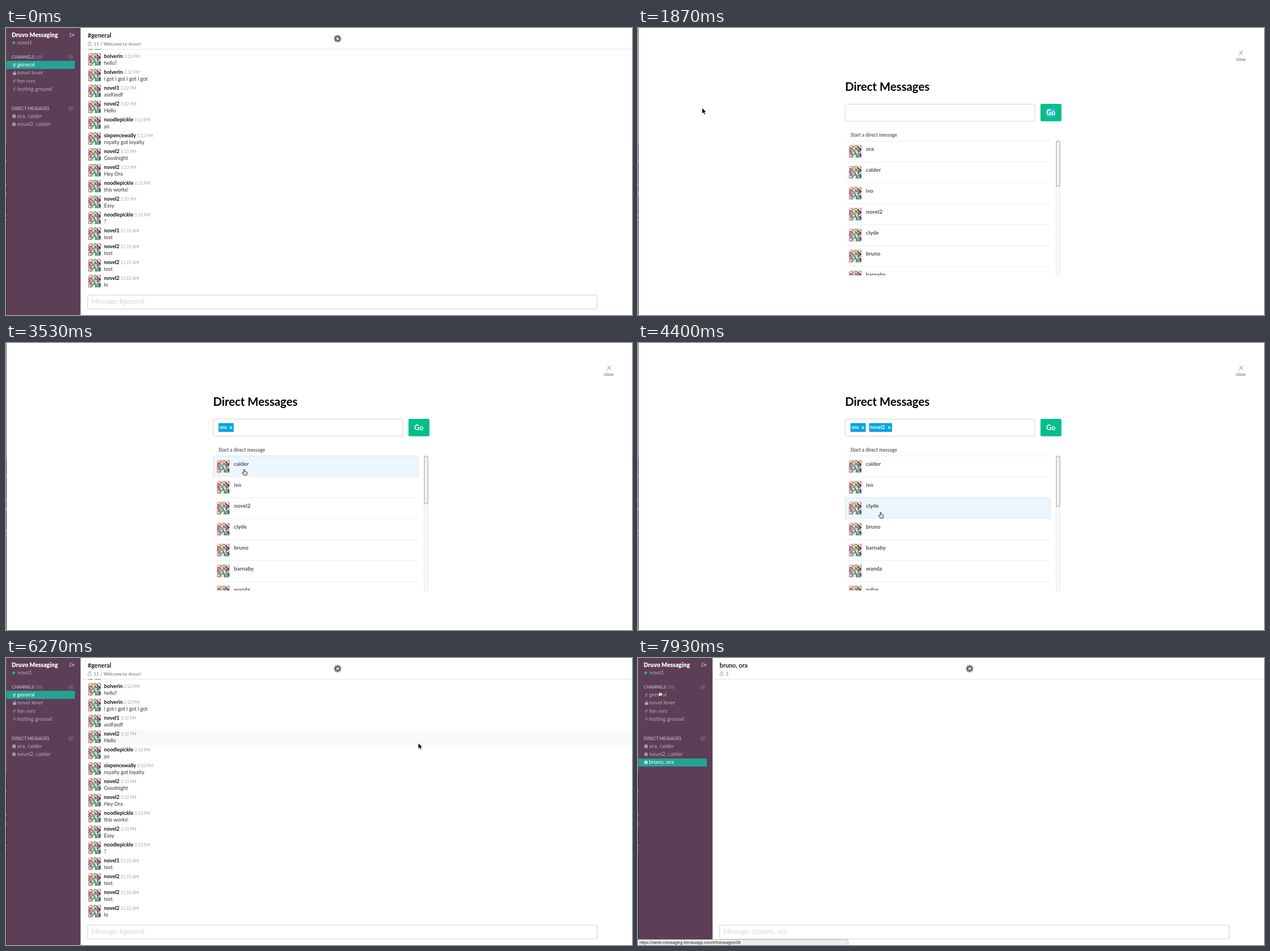
Recreate the animation shown at these times as an HTML page. Size 1104x507 px, loop 8000 ms.

```html
<!DOCTYPE html>
<html lang="en">
<head>
<meta charset="utf-8">
<title>Team chat</title>
<style>
  html, body { margin: 0; width: 100%; height: 100%; overflow: hidden; background: #fff; }
  svg { display: block; width: 1104px; height: 507px; font-family: Lato, "Open Sans", sans-serif; }
  text { white-space: pre; }
  .b { font-weight: 700; }
  .l { font-weight: 300; }
</style>
</head>
<body>
<svg viewBox="0 0 1104 507" xmlns="http://www.w3.org/2000/svg">
  <defs>
    <symbol id="avatar" viewBox="0 0 22 22" width="22" height="22"></symbol>
    <clipPath id="feedClip"><rect x="132" y="37" width="972" height="430"/></clipPath>
    <clipPath id="listClip"><rect x="365" y="199" width="363" height="238"/></clipPath>
  </defs>
  <g id="scene"></g>
  <g id="edge">
    <rect width="1" height="205" fill="#6d5450"/>
    <rect y="205" width="1" height="302" fill="#25202c"/>
    <path d="M.5 233v5M.5 275v4M.5 290v6M.5 330v3M.5 338v3" stroke="#77707c"/>
  </g>
  <g id="status"></g>
  <g id="arrow">
    <path d="M0 0V10.6L2.4 8.4L4.1 12.1L6 11.2L4.4 7.7H7.6Z" fill="#000" stroke="#fff" stroke-width=".8"/>
  </g>
  <g id="hand">
    <path d="M-.9 .6Q0-.7 .9 .6V4L4.6 4.8Q5.6 5.2 5.3 6.6L4.4 10.2H-1L-3.7 6.3Q-3.6 4.9-2.3 5.5L-.9 6.6Z"
      fill="#fff" stroke="#111" stroke-width=".9"/>
    <path d="M1.3 6.5v2M2.9 6.5v2" stroke="#111" stroke-width=".5"/>
  </g>
</svg>
<script>
const LOOP = 8000, TICK = 1000 / 15;
const $ = id => document.getElementById(id);

const users = ["ora", "calder", "ivo", "novel2", "clyde", "bruno", "barnaby", "wanda", "rufus", "penrose"];
const USER_COUNT = 19, ROW = 37;
const feed = [
  ["bolverin", "3:32 PM", "hello?"],
  ["bolverin", "3:32 PM", "i got i got i got i got"],
  ["novel1", "3:32 PM", "asdfasdf"],
  ["novel2", "3:32 PM", "Hello"],
  ["noodlepickle", "3:33 PM", "yo"],
  ["sixpencewally", "3:33 PM", "royalty got loyalty"],
  ["novel2", "3:33 PM", "Goodnight"],
  ["novel2", "3:33 PM", "Hey Ora"],
  ["noodlepickle", "3:33 PM", "this works!"],
  ["novel2", "3:33 PM", "Easy"],
  ["noodlepickle", "3:33 PM", "?"],
  ["novel1", "11:22 AM", "test"],
  ["novel2", "11:22 AM", "test"],
  ["novel2", "11:22 AM", "test"],
  ["novel2", "11:22 AM", "hi"]
];

// time, x, y of the pointer tip
const path = [
  [60, 500, 474], [870, 225, 445], [1267, 63, 142], [1600, 113, 141], [1900, 113, 141],
  [2667, 353, 210], [2870, 295, 206], [3270, 420, 222], [3500, 420, 222],
  [3950, 428, 299], [4420, 428, 299], [4730, 431, 322], [4930, 431, 322],
  [5200, 438, 176], [5400, 444, 158], [5500, 446, 150], [5650, 446, 150],
  [6060, 727, 150], [7130, 727, 150], [7800, 151, 63], [7934, 38, 57]
];
// time, page, chosen users
const steps = [
  [0, "general", []],
  [1860, "picker", []],
  [3330, "picker", ["ora"]],
  [4060, "picker", ["ora", "novel2"]],
  [4860, "picker", ["ora", "novel2", "bruno"]],
  [5590, "picker", ["ora", "bruno"]],
  [6260, "general", []],
  [7060, "direct", []]
];

const text = (x, y, size, fill, str, cls = "", extra = "") =>
  `<text x="${x}" y="${y}" font-size="${size}" fill="${fill}" class="${cls}" ${extra}>${str}</text>`;
const rect = (x, y, w, h, fill, extra = "") =>
  `<rect x="${x}" y="${y}" width="${w}" height="${h}" fill="${fill}" ${extra}/>`;
const line = (d, stroke, w = 1) => `<path d="${d}" fill="none" stroke="${stroke}" stroke-width="${w}"/>`;
const avatar = (x, y) => `<use href="#avatar" x="${x}" y="${y}"/>`;

const pen = document.createElement("canvas").getContext("2d");
function widthOf(str, size) {
  pen.font = `700 ${size * 10}px Lato, "Open Sans", sans-serif`;
  return pen.measureText(str).width / 10;
}

// A confetti of small leaves and shards: warm at the left, green in the middle, navy at the right
function buildAvatar() {
  let seed = 29;
  const rnd = n => (seed = seed * 16807 % 2147483647) / 2147483647 * n;
  const pick = list => list[Math.floor(rnd(list.length))];
  const warm = ["#d8344f", "#ee7683", "#c22f5d", "#2c9c86", "#f3eee8"];
  const green = ["#2a8f6c", "#57b39a", "#efc04d", "#f5f1ea", "#d9455a", "#f5f1ea"];
  const cool = ["#27325c", "#e4574f", "#2f8f72", "#f5f1ea", "#3c2b52"];
  let out = rect(0, 0, 22, 22, "#e9e2dc");
  for (let i = 0; i < 81; i++) {
    const x = (i % 9) * 2.7 + rnd(1.6) - .6, y = Math.floor(i / 9) * 2.7 + rnd(1.6) - .6;
    const c = pick(x < 7 ? warm : x < 15 ? green : cool), a = rnd(180).toFixed();
    const shape = i % 3 ? 'd="M-1.9-1.4L2-.8L-.4 2Z"' : 'd="M-2 0Q0-2 2 0Q0 2-2 0Z"';
    out += `<path ${shape} fill="${c}" transform="translate(${x.toFixed(1)} ${y.toFixed(1)}) rotate(${a})"/>`;
  }
  $("avatar").innerHTML = out;
}

function plus(y) {
  return `<circle cx="114.3" cy="${y}" r="3.7" fill="none" stroke="#94808f" stroke-width=".8"/>` +
    line(`M112.3 ${y}h4M114.3 ${y - 2}v4`, "#94808f", .8);
}

function sidebar(direct) {
  const soft = "#b9a9b6", dim = "#9a8796";
  let out = rect(0, 0, 131.5, 507, "#5c3e57");
  out += text(10, 16, 10.4, "#fff", "Druvo Messaging", "", 'font-weight="900"');
  out += line("M115.5 9.3h-2.6v6h2.6M115 12.3h4.6M117.6 10l2.3 2.3l-2.3 2.3", "#c2b4c0", 1.1);
  out += `<circle cx="13.6" cy="26" r="2.5" fill="#1fb39a"/>` + text(19.7, 28.6, 8.9, soft, "novel1");
  out += text(10, 54.4, 7.5, soft, `CHANNELS <tspan font-weight="400" fill="${dim}">(10)</tspan>`, "b") + plus(51.3);
  out += text(10, 145, 7.5, soft, "DIRECT MESSAGES", "b") + plus(142);

  out += rect(1, direct ? 177.5 : 58, 120.5, 14.3, "#26a295", 'rx="1.5"');
  ["general", "novel lever", "fen rvrs", "testing ground"].forEach((name, i) => {
    const y = 68.2 + i * 14.25, on = !i && !direct;
    out += i === 1
      ? rect(12.2, y - 3.6, 5.6, 4, soft, 'rx=".5"') + line(`M13.4 ${y - 3.4}v-1.4a1.6 1.6 0 0 1 3.2 0v1.4`, soft, .9)
      : text(12, y + .3, 9.2, on ? "#d8efec" : dim, "#");
    out += text(19.5, y, 9.7, on ? "#fff" : soft, name);
  });
  const talks = ["ora, calder", "novel2, calder"];
  if (direct) talks.push("bruno, ora");
  talks.forEach((name, i) => {
    const y = 158.8 + i * 14.2, on = i === 2;
    out += rect(11.4, y - 5.7, 5.6, 5.8, on ? "#d8efec" : soft, 'rx="1"');
    out += text(12.9, y - 1.1, 4.6, on ? "#26a295" : "#5c3e57", "2", "b");
    out += text(19.5, y, 9.7, on ? "#fff" : soft, name);
  });
  return out;
}

function gear() {
  let teeth = "";
  for (let i = 0; i < 8; i++) teeth += rect(-1.5, -6.5, 3, 4, "#6d6d6d", `rx=".5" transform="rotate(${i * 45})"`);
  return `<g transform="translate(584.8 18.8)">${teeth}<circle r="3.5" fill="none" stroke="#6d6d6d" stroke-width="2.8"/></g>`;
}

function chat(direct, hover) {
  let out = rect(0, 0, 1104, 507, "#fff") + line("M132 37.5H1104", "#e4e4e4");
  if (!direct) {
    out += '<g clip-path="url(#feedClip)">' + avatar(145, 16.3);
    feed.forEach(([name, time, msg], i) => {
      const y = 42 + i * 28;
      if (hover === i) out += rect(132, y, 972, 28, "#f9f9f9");
      out += avatar(145, y + 2.3);
      out += text(172.8, y + 11, 9.1, "#111",
        `${name}<tspan dx="2" font-size="7.4" font-weight="400" fill="#a5a5a5">${time}</tspan>`, "b");
      out += text(172.8, y + 23, 9.1, "#333", msg);
    });
    out += "</g>";
  }
  out += text(144, 17, 10.8, "#222", direct ? "bruno, ora" : "#general", "b");
  out += '<circle cx="147.6" cy="26" r="1.9" fill="none" stroke="#888" stroke-width=".8"/>' +
    line("M145.7 27.5q-1.4.4-1.4 2.6q0 1.1 1 1.1h4.6q1 0 1-1.1q0-2.2-1.4-2.6", "#888", .8);
  out += text(154.5, 30.8, 8.3, "#777", direct ? "3" : "11");
  if (!direct) out += line("M168.2 23.5v9", "#999", .8) + text(172, 30.6, 7.9, "#666", "Welcome to druvo!");
  out += gear();
  out += rect(144, 472, 898.5, 24.3, "#fff", 'rx="2.5" stroke="#d2d2d2" stroke-width="1.1"');
  out += text(151, 487.4, 12, "#b5b5b5", "Message " + (direct ? "@bruno, ora" : "#general"), "l");
  return out + sidebar(direct);
}

function tags(chosen) {
  let x = 374.7, out = "";
  for (const name of chosen) {
    const w = widthOf(name, 8.7);
    out += rect(x, 141.5, w + 14.3, 15.5, "#06a4e2", 'rx="1"');
    out += text(x + 2, 152.2, 8.7, "#fff", name, "b") + text(x + w + 7, 152.2, 8.7, "#fff", "x", "b");
    x += w + 20.3;
  }
  return out;
}

function picker(chosen, hover) {
  let out = rect(0, 0, 1104, 507, "#fff");
  out += text(1063.3, 47.6, 12.5, "#555", "X", "l", 'font-style="italic" text-anchor="middle"');
  out += text(1063.3, 57.8, 7.7, "#555", "close", "", 'text-anchor="middle"');
  out += text(365.3, 110.8, 20.3, "#000", "Direct Messages", "b");
  out += rect(365.5, 134.5, 334.5, 30, "#fff", 'rx="2" stroke="#d4d4d4"') + tags(chosen);
  out += rect(709.8, 134, 37, 30.7, "#05be8a", 'rx="2"');
  if (!chosen.length) out += rect(720, 141.8, 15.6, 14.8, "#3cb9d0");
  out += text(728, 153.6, 12.4, "#fff", "Go", "b", 'text-anchor="middle"');
  out += text(374.7, 192, 8.45, "#666", "Start a direct message", "b");

  out += '<g clip-path="url(#listClip)">';
  const rows = users.filter(u => !chosen.includes(u)).slice(0, 7);
  rows.forEach((name, i) => {
    const y = 199.5 + i * ROW;
    out += line(`M365 ${y}H727`, "#ededed");
    if (hover === i) out += rect(365.5, y, 361.5, ROW, "#edf6fc", 'rx="2" stroke="#cfe3ef"');
    out += avatar(372, y + 7.2) + text(402, y + 17.5, 9.7, "#555", name, "b");
  });
  out += "</g>";

  const thumb = 237 * 237 / (ROW * (USER_COUNT - chosen.length));
  out += rect(737.5, 199.5, 6.5, 237.5, "#fafafa", 'rx="2.5" stroke="#e2e2e2"');
  return out + rect(737.7, 199.7, 6.2, thumb, "#f3f3f3", 'rx="2.8" stroke="#b0b0b0" stroke-width="1.2"');
}

function pointer(t) {
  let i = 0;
  while (i < path.length - 2 && t >= path[i + 1][0]) i++;
  const [t0, x0, y0] = path[i], [t1, x1, y1] = path[i + 1];
  const k = Math.min(1, Math.max(0, (t - t0) / (t1 - t0))), e = k * k * (3 - 2 * k);
  return [x0 + (x1 - x0) * e, y0 + (y1 - y0) * e];
}

let shown = "";
function render(now) {
  const t = Math.floor((now % LOOP + 5) / TICK) * TICK;
  const [x, y] = pointer(t);
  const [, page, chosen] = steps.filter(s => s[0] <= t).pop();
  const visible = t > 50;
  let hover = -1, link = false;
  if (page === "picker") {
    if (x > 365 && x < 727 && y > 199 && y < 437) hover = Math.floor((y - 199.5) / ROW);
    const onButton = x > 710 && x < 747 && y > 134 && y < 165;
    const onTag = x > 443 && x < 451 && y > 141 && y < 157 && chosen.length > 2;
    link = hover >= 0 || onButton || onTag;
  } else {
    if (visible && x > 132 && y > 42 && y < 462) hover = Math.floor((y - 42) / 28);
    link = Math.hypot(x - 114, y - 142) < 6 || (page === "direct" && x < 122);
  }

  const key = page + chosen + hover;
  if (key !== shown) {
    shown = key;
    $("scene").innerHTML = page === "picker" ? picker(chosen, hover) : chat(page === "direct", hover);
  }
  $("status").setAttribute("visibility", t > 7790 ? "visible" : "hidden");
  const at = `translate(${x.toFixed(1)} ${y.toFixed(1)})`;
  for (const [id, on] of [["arrow", !link], ["hand", link]]) {
    $(id).setAttribute("transform", at);
    $(id).setAttribute("visibility", visible && on ? "visible" : "hidden");
  }
}

buildAvatar();
$("status").innerHTML = rect(-2, 497.5, 372.5, 12, "#ededed", 'rx="2" stroke="#bdbdbd"') +
  text(3, 504.6, 7.2, "#222", "https://sleek-messaging.herokuapp.com/#/messages/28", "",
    'font-family="Liberation Sans, Arial, sans-serif"');

const start = performance.now();
function frame() {
  render(performance.now() - start);
  requestAnimationFrame(frame);
}
frame();
</script>
</body>
</html>
```
